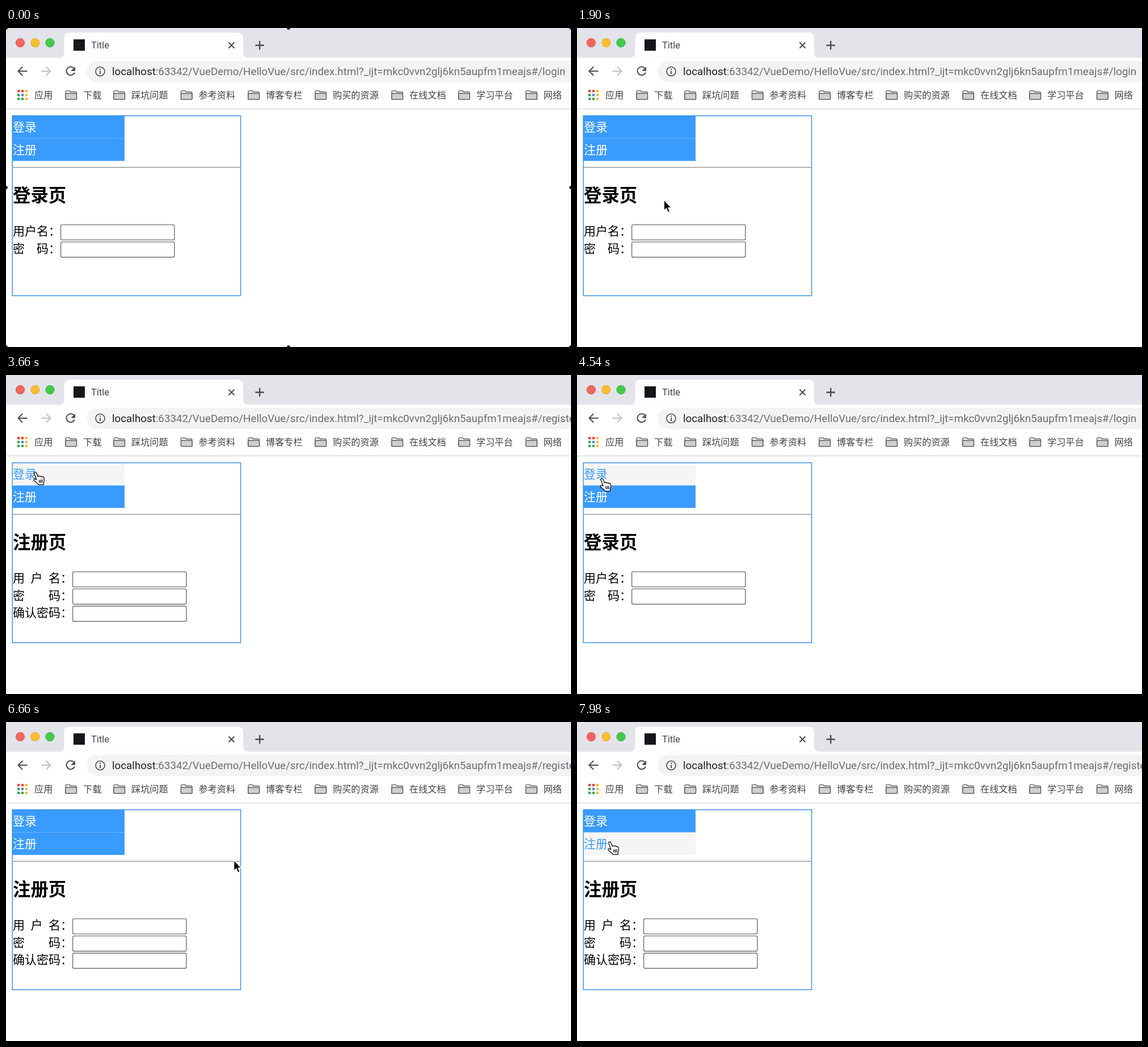
Write an HTML page that moves like this. It is 996 by 562 pixels and loops after 8 s.

```html
<!DOCTYPE html>
<html lang="zh-CN">
<head>
<meta charset="utf-8">
<title>Title</title>
<style>
html, body { margin: 0; width: 100%; height: 100%; overflow: hidden; background: #fff; }
svg { display: block; }
text { font-family: "Noto Sans CJK SC", "Noto Sans CJK", "Noto Sans", sans-serif; font-size: 21px; }
.ui { font-family: Roboto, "Liberation Sans", sans-serif; }
.mark text { font-size: 16.2px; fill: #404347; }
.line { fill: none; stroke: #4b4e52; stroke-width: 2; }
.item rect { fill: #3a9bff; }
.item text { fill: #fff; }
.item.over rect { fill: #f5f5f5; }
.item.over text { fill: #3a9bff; }
.title { font-size: 31.4px; font-weight: 700; }
.field { fill: #fff; stroke: #707070; stroke-width: 1.4; }
.field.over { stroke: #444; }
.tint { fill: #ff8a86; mix-blend-mode: multiply; }
.glow { fill: #f00; mix-blend-mode: screen; }
</style>
</head>
<body>
<svg id="stage" width="996" height="562" viewBox="0 0 996 562">
  <rect width="996" height="562" fill="#fff"/>

  <!-- tab strip -->
  <rect width="996" height="52.5" fill="#e3e3ea"/>
  <path d="M92 52.5Q102.5 52.5 102.5 42V18Q102.5 8 112.5 8H408Q418 8 418 18V42Q418 52.5 429 52.5Z" fill="#fff"/>
  <g stroke-width=".8">
    <circle cx="25" cy="26" r="7.7" fill="#f2655f" stroke="#dc504a"/>
    <circle cx="51.3" cy="26" r="7.7" fill="#fabf30" stroke="#e0a528"/>
    <circle cx="77.5" cy="26" r="7.7" fill="#42c94b" stroke="#33b03c"/>
  </g>
  <rect x="119" y="20" width="20" height="20" fill="#17151c"/>
  <text class="ui" x="150" y="35.7" style="font-size:16.5px" fill="#414448">Title</text>
  <path class="line" d="M392.5 25.5l10 10m0-10l-10 10"/>
  <path class="line" d="M439.5 30.5h15.5m-7.75-7.75v15.5" style="stroke-width:2.4"/>

  <!-- toolbar -->
  <path class="line" d="M37.5 76H21.5m7.7-7.7l-7.7 7.7 7.7 7.7"/>
  <path class="line" d="M62.500 76h16m-7.7-7.7l7.7 7.7-7.7 7.7" style="stroke:#bdbfc2"/>
  <path class="line" d="M119.500 70.500A7.500 7.500 0 1 0 121 78.500"/>
  <path d="M122 68v7.800h-7.800z" fill="#4b4e52"/>
  <rect x="142" y="58" width="900" height="37" rx="18.5" fill="#f1f3f4"/>
  <circle class="line" cx="166" cy="76.5" r="8" style="stroke-width:1.6"/>
  <path class="line" d="M166 75.5v5.5m0-9.5v2"/>
  <text class="ui" x="187" y="83" style="font-size:18.8px" fill="#6a6e72"><tspan fill="#202124">localhost</tspan>:63342/VueDemo/HelloVue/src/index.html?_ijt=mkc0vvn2glj6kn5aupfm1meajs#/<tspan id="route">login</tspan></text>

  <!-- bookmarks -->
  <g class="mark" id="marks"><text x="50" y="123.7">应用</text></g>
  <path d="M0 142.5H996" stroke="#dcdcde" stroke-width="1.3"/>

  <!-- page -->
  <g class="item" id="menuLogin"><rect x="11" y="155" width="198" height="39.6"/><text x="12" y="182.3">登录</text></g>
  <g class="item" id="menuRegister"><rect x="11" y="194.6" width="198" height="39.6"/><text x="12" y="221.8">注册</text></g>
  <path d="M12 245.4H413" stroke="#999" stroke-width="1.5"/>
  <rect x="11.2" y="154.6" width="402.4" height="317" fill="none" stroke="#2f8ce4" stroke-width="1.4"/>

  <g id="login">
    <text class="title" x="12" y="305.9">登录页</text>
    <text x="12" y="365.2">用户名：</text>
    <text x="12 54 75" y="395.6">密码：</text>
  </g>
  <g id="register">
    <text class="title" x="12" y="305.9">注册页</text>
    <text x="12 43.5 75 96" y="365.2">用户名：</text>
    <text x="12 75 96" y="395.6">密码：</text>
    <text x="12" y="425.8">确认密码：</text>
  </g>

  <circle class="ripple tint"/>
  <circle class="ripple glow"/>
  <g id="cursor">
    <path id="arrow" d="M0 0V18.500L4.200 14.700 7 21.600 10.200 20.300 7.400 13.500H13Z" fill="#000" stroke="#fff" stroke-width="1.200"/>
    <g id="hand" transform="translate(-.8 0) scale(1.04)" stroke="#000" stroke-width="1.2" stroke-linejoin="round" stroke-linecap="round">
      <path fill="#fff" d="M-3.200 2.500C-3.800 0 -.8-1 .3 1.200L3 7.500C4 6.200 6 6.400 6.600 7.800 7.800 6.600 9.600 7 10 8.600 11.300 7.600 13 8.400 13.300 10 14 13 13.600 16 12.600 18L12.400 21.500H4C2.500 18.800 0 17.400-3.400 14.600-5 13-3.500 11-1.400 12L.6 13Z"/>
      <path fill="none" d="M5 13.500l.8 4.500m1.800-4.800l.6 4.500m1.900-4.800l.3 4.500"/>
    </g>
    <path id="beam" fill="none" stroke="#222" stroke-width="1.3" d="M-4-10.500Q0-10.500 0-8 0-10.500 4-10.500M0-8V8M-4 10.500Q0 10.500 0 8 0 10.500 4 10.500M-2.500 4h5"/>
  </g>
  <g id="grips" fill="#222"></g>
</svg>

<script>
const LOOP = 8000;
const $ = id => document.getElementById(id);

function add(parent, tag, attrs, text) {
  const el = document.createElementNS("http://www.w3.org/2000/svg", tag);
  for (const key in attrs) el.setAttribute(key, attrs[key]);
  if (text) el.textContent = text;
  return parent.appendChild(el);
}

// launcher grid and bookmark folders
const red = "#e8453c", yellow = "#f9bb2d", green = "#3aa757", blue = "#4688f1";
[red, red, yellow, green, blue, yellow, green, green, yellow].forEach((fill, i) =>
  add($("marks"), "rect", { x: 20 + i % 3 * 6.9, y: 109 + Math.floor(i / 3) * 6.9, width: 4.3, height: 4.3, fill }));

const folders = { 下载: 104, 踩坑问题: 189, 参考资料: 307.5, 博客专栏: 426, 购买的资源: 544, 在线文档: 679, 学习平台: 797, 网络: 915.5 };
for (const name in folders) {
  const x = folders[name];
  const stroke = { stroke: "#4c4c4c", "stroke-width": 1.2, "stroke-linejoin": "round" };
  add($("marks"), "path", { ...stroke, fill: "#e9e9e9", d: `M${x + 1} 125.5V112q0-1.5 1.5-1.5h5.5l2 2.2h9q1.5 0 1.5 1.5v11.3z` });
  add($("marks"), "rect", { ...stroke, fill: "#cfcfcf", x: x + 1, y: 115.3, width: 19.5, height: 10.5, rx: 1.3 });
  add($("marks"), "text", { x: x + 32, y: 123.7 }, name);
}

// form fields, and the grips around the stage
const fields = [];
function addFields(page, x, count) {
  for (let i = 0; i < count; i++) {
    const y = 346.6 + i * 30.3;
    fields.push({ page, x, y, el: add($(page), "rect", { class: "field", x: x + .6, y, width: 200.3, height: 26.8, rx: 2.5 }) });
  }
}
addFields("login", 96, 2);
addFields("register", 117, 3);

for (const cx of [0, 498, 996])
  for (const cy of [0, 281, 562])
    if (cx !== 498 || cy !== 281) add($("grips"), "circle", { cx, cy, r: 3 });

// pointer stops: time, x, y
const stops = [
  [480, 176, 462], [700, 172, 400], [950, 164.5, 332.3], [1320, 164.5, 332.3],
  [1540, 163, 357], [1740, 160, 350], [2000, 148, 265], [2100, 142, 235],
  [2220, 132, 212], [2380, 131.5, 210.5], [2860, 131.5, 210.5], [3340, 72, 199],
  [3660, 54, 171], [3860, 45, 167], [4330, 45, 167], [4800, 48, 203],
  [5060, 48, 203], [5180, 48.5, 205.3], [5700, 48.5, 205.3], [6100, 62, 212],
  [6240, 62, 212], [6660, 401, 243.5], [7020, 664, 310], [7140, 664, 310],
  [7500, 340, 242], [7880, 62, 212], [7980, 60, 211]
];
const clicks = [1000, 2570, 4000, 5400];
const routes = [[0, "login"], [2760, "register"], [4180, "login"], [5580, "register"]];

function slope(i, k) {
  if (i < 1 || i >= stops.length - 1) return 0;
  const rate = j => (stops[j + 1][k] - stops[j][k]) / (stops[j + 1][0] - stops[j][0]);
  const a = rate(i - 1), b = rate(i);
  return a * b > 0 ? 2 * a * b / (a + b) : 0;
}

function pointer(t) {
  const last = stops.length - 1;
  if (t >= stops[last][0]) return stops[last].slice(1);
  let i = 0;
  while (i < last - 1 && t >= stops[i + 1][0]) i++;
  const span = stops[i + 1][0] - stops[i][0];
  const u = Math.max(0, (t - stops[i][0]) / span), v = 1 - u;
  return [1, 2].map(k =>
    (1 + 2 * u) * v * v * stops[i][k] + u * u * (3 - 2 * u) * stops[i + 1][k] +
    span * u * v * (v * slope(i, k) - u * slope(i + 1, k)));
}

const show = (id, on) => { $(id).style.display = on ? "" : "none"; };
const rings = document.querySelectorAll(".ripple");

function drawRipple(t) {
  const start = clicks.find(c => t >= c && t < c + 400);
  const on = start !== undefined;
  const p = on ? (t - start) / 400 : 1;
  const [x, y] = pointer(on ? start : t);
  for (const ring of rings) {
    ring.setAttribute("cx", x);
    ring.setAttribute("cy", y + .3);
    ring.setAttribute("r", 33.5 * (1 - (1 - p) ** 4));
    ring.style.opacity = Math.min(1, (1 - p) / .6);
  }
}

function draw(t) {
  const page = routes.filter(r => t >= r[0]).pop()[1];
  const active = t >= 480;
  const [x, y] = pointer(t);
  const inMenu = active && x > 11 && x < 209 && y > 155 && y < 234.2;
  let typing = false;

  show("login", page === "login");
  show("register", page === "register");
  $("route").textContent = page;
  $("menuLogin").classList.toggle("over", inMenu && y < 194.6);
  $("menuRegister").classList.toggle("over", inMenu && y >= 194.6);
  for (const f of fields) {
    const over = active && f.page === page && x > f.x && x < f.x + 201 && y > f.y && y < f.y + 27;
    f.el.classList.toggle("over", over);
    typing = typing || over;
  }

  show("grips", t < 60);
  show("cursor", active);
  show("hand", inMenu);
  show("beam", typing);
  show("arrow", !inMenu && !typing);
  $("cursor").setAttribute("transform", `translate(${x} ${y})`);
  drawRipple(t);
}

function tick() {
  draw(performance.now() % LOOP);
  requestAnimationFrame(tick);
}
tick();
</script>
</body>
</html>
```
